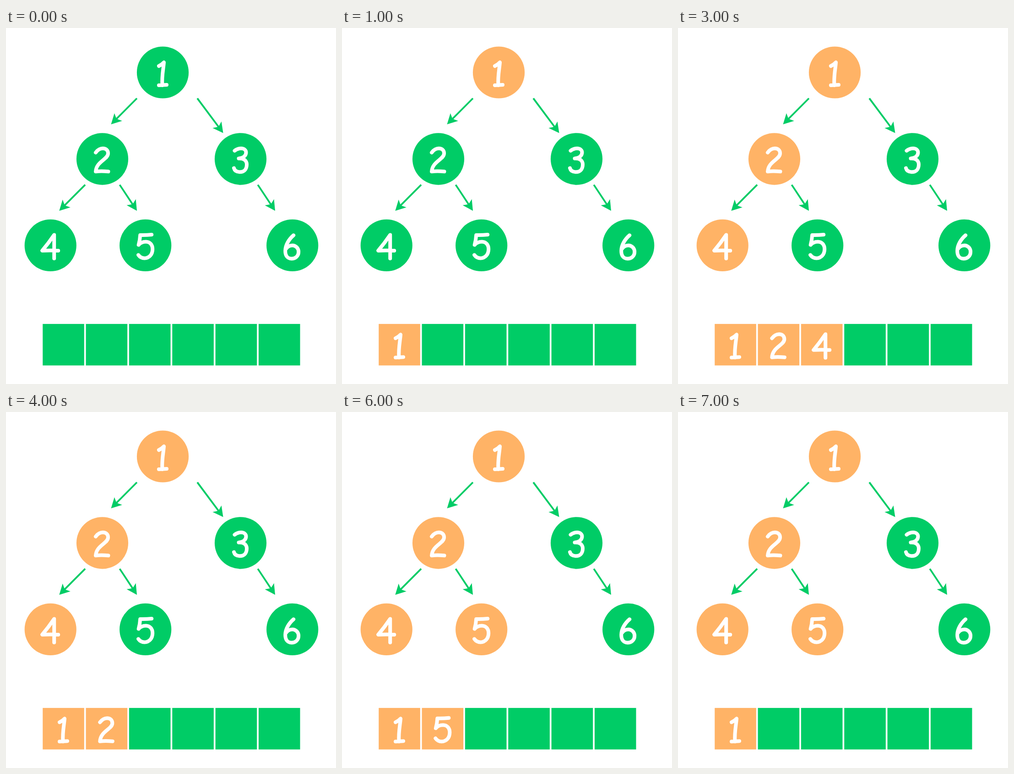
These frames come from a looping animation (721x777 px, 8000 ms). An HTML page:

```html
<!DOCTYPE html>
<html lang="en">
<head>
<meta charset="utf-8">
<title>Depth-first search with a stack</title>
<style>
  html, body { margin: 0; width: 100%; height: 100%; overflow: hidden; background: #fff; }
  svg { display: block; width: 721px; height: 777px; }
  .digit { fill: none; stroke: #fff; stroke-width: 8; stroke-linecap: round; stroke-linejoin: round; }
</style>
</head>
<body>
<svg id="stage" viewBox="0 0 721 777"></svg>
<script>
const GREEN = "#00cc66", ORANGE = "#ffb366";
const STEP = 1000;

// Stack contents at each step; a node stays marked once it has been pushed.
const STACKS = ["", "1", "12", "124", "12", "1", "15", "1"];

// Handwritten numerals, drawn around the centre of their node or cell.
const DIGITS = {
  1: "M-8.5-14Q-2-17 2.5-22C1.5-8-2.5 8-1 28M-8.5 28L8.5 27",
  2: "M-14.5-14C-10-20-5-23 1-23C8-23 12.5-19 12.5-12C12.5 1-13 5-14.5 27.5Q-3 26 13 27.5",
  3: "M-13-18C-8-22-4-23 1-23C8-23 12-19 12-14C12-6 4-2-4-1C7-2 13.5 4 13.5 12C13.5 23 7 28.5-1 28.5C-8 28.5-13 26-14.5 20",
  4: "M8 28.5L8-23Q-5-4-18 11.5Q0 10.5 17 11.5",
  5: "M13.5-23.5Q0-22-11.5-22.5Q-12-12-15-1C-11-6-5-8 1-8C10-8 15.5-1 15.5 8C15.5 20 8 28-2 28C-8 28-12 26-15.5 21",
  6: "M2.5-22C-8-13-15.5 0-15.5 12C-15.5 23-10 29-2 29C7 29 13.5 23 13.5 14C13.5 6 7 0 0 0C-7 0-12 4-15 9"
};

const NODES = [
  [342.5, 97], [210.5, 285.8], [512.5, 285.8],
  [97.2, 474.4], [304.7, 474.4], [625.7, 474.4]
];

const ARROWS = [
  [286, 153.5, 229.5, 210.3], [418, 153.5, 474.5, 229.2],
  [173, 342.2, 116.3, 399], [248.4, 342.2, 286, 399], [550.2, 342.2, 588, 399]
];

const stage = document.getElementById("stage");

function add(parent, tag, attrs) {
  const el = document.createElementNS("http://www.w3.org/2000/svg", tag);
  for (const key in attrs) el.setAttribute(key, attrs[key]);
  return parent.appendChild(el);
}

function addArrow([x1, y1, x2, y2]) {
  const angle = Math.atan2(y2 - y1, x2 - x1) * 180 / Math.PI;
  const length = Math.hypot(x2 - x1, y2 - y1);
  const g = add(stage, "g", { transform: `translate(${x2} ${y2}) rotate(${angle})` });
  add(g, "path", { d: `M${-length} 0H-16`, stroke: GREEN, "stroke-width": 3.8 });
  add(g, "path", { d: "M0 0L-22.5-12L-17 0L-22.5 12Z", fill: GREEN });
}

function addShape(x, y, tag, attrs) {
  const g = add(stage, "g", { transform: `translate(${x} ${y})` });
  return {
    shape: add(g, tag, attrs),
    digit: add(g, "path", { class: "digit" })
  };
}

function paint(item, value, marked) {
  item.shape.setAttribute("fill", marked ? ORANGE : GREEN);
  item.digit.setAttribute("d", DIGITS[value] || "");
}

ARROWS.forEach(addArrow);
const nodes = NODES.map(([x, y]) => addShape(x, y, "circle", { r: 56.6 }));
const cells = NODES.map((_, i) =>
  addShape(125.5 + i * 94.35, 691.2, "rect", { x: -45.3, y: -45.3, width: 90.6, height: 90.6 }));

let shown = -1;

function draw() {
  const step = Math.floor(performance.now() / STEP) % STACKS.length;
  if (step !== shown) {
    shown = step;
    const visited = STACKS.slice(0, step + 1).join("");
    nodes.forEach((node, i) => paint(node, i + 1, visited.includes(i + 1)));
    cells.forEach((cell, i) => paint(cell, STACKS[step][i], i < STACKS[step].length));
  }
  requestAnimationFrame(draw);
}
draw();
</script>
</body>
</html>
```
